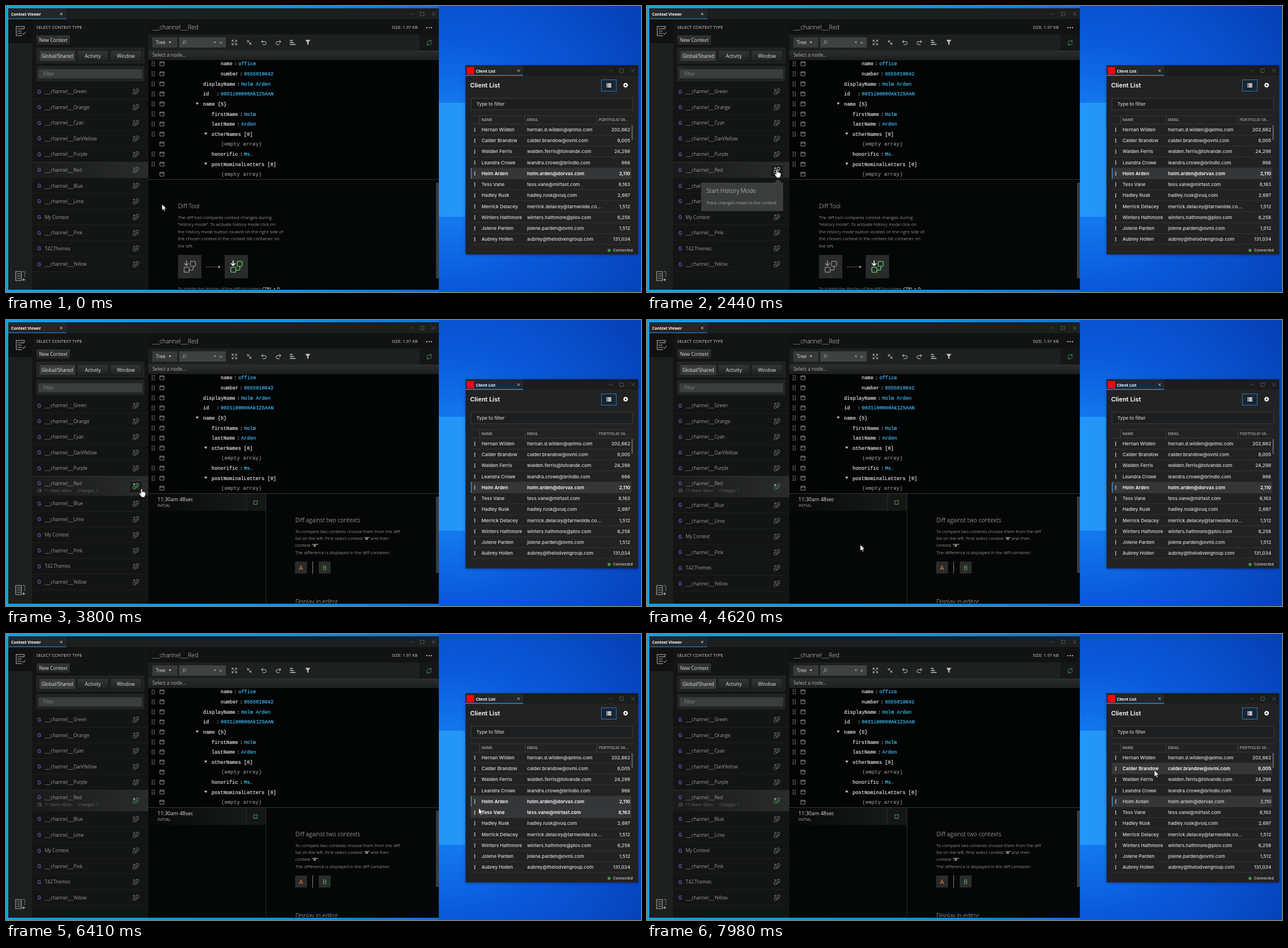
Write an HTML page that moves like this. It is 1115 px wide and 502 px high and loops after 8000 ms.

```html
<!DOCTYPE html>
<html lang="en">
<head>
<meta charset="utf-8">
<title>Context Viewer</title>
<style>
html, body { margin: 0; width: 100%; height: 100%; overflow: hidden; background: #0a58d0; }
svg { display: block; }
text { font-family: "Open Sans", "Noto Sans", sans-serif; white-space: pre; }
.light { font-weight: 300; }
.bold { font-weight: 700; }
.mono { font-family: "Liberation Mono", "DejaVu Sans Mono", monospace; }
.client { font-family: Inter, Roboto, sans-serif; font-weight: 500; }
.head { font-family: Inter, Roboto, sans-serif; font-weight: 600; }
.strong .client { font-weight: 600; fill: #fff; }
.em { font-weight: 600; font-style: italic; fill: #e6e2c8; }
.line { fill: none; stroke: currentColor; stroke-linecap: round; stroke-linejoin: round; }
</style>
</head>
<body>
<svg id="stage" width="1115" height="502" viewBox="0 0 1115 502" xmlns="http://www.w3.org/2000/svg"></svg>
<script>
const W = 1115, H = 502, LOOP = 8000;

// Markup helpers
const box = (x, y, w, h, fill, more = '') =>
  `<rect x="${x}" y="${y}" width="${w}" height="${h}" fill="${fill}" ${more}/>`;
const txt = (x, y, s, size, fill, cls = '', more = '') =>
  `<text x="${x}" y="${y}" font-size="${size}" fill="${fill}" class="${cls}" ${more}>${s}</text>`;
const mono = (x, y, s, size, fill) =>
  txt(x, y, s, size, fill, 'mono', `stroke="${fill}" stroke-width=".22"`);
const line = (d, color, w = 1, more = '') =>
  `<path class="line" d="${d}" style="color:${color}" stroke-width="${w}" ${more}/>`;
const shape = (d, fill, more = '') => `<path d="${d}" fill="${fill}" ${more}/>`;
const group = (id, body, more = '') => `<g id="${id}" ${more}>${body}</g>`;
const at = (x, y, body, scale = 1) => `<g transform="translate(${x} ${y}) scale(${scale})">${body}</g>`;
const stops = list => list.map(([o, c]) => `<stop offset="${o}" stop-color="${c}"/>`).join('');
const grad = (id, list, dir = 'x2="1" y2="0"') =>
  `<linearGradient id="${id}" ${dir}>${stops(list)}</linearGradient>`;
const down = 'x2="0" y2="1"';

const defs = `<defs>
  ${grad('sky', [[0, '#08a4ee'], [.45, '#0694ea'], [.68, '#0670e0']])}
  <radialGradient id="glow" gradientUnits="userSpaceOnUse" cx="775" cy="275" r="430">
    ${stops([[0, '#2c9cff'], [.2, '#147cf0'], [.5, '#0a5adc'], [1, '#0640b6']])}</radialGradient>
  ${grad('button', [[0, '#343636'], [1, '#202222']], down)}
  ${grad('node', [[0, '#2c2e2e'], [1, '#1c1e1e']], down)}
  ${grad('picked', [[0, '#191a1a'], [1, '#2a2c2c']])}
  ${grad('entry', [[0, '#070808'], [1, '#1b1c1c']])}
  <clipPath id="pane"><rect x="250" y="305" width="510" height="192"/></clipPath>
  <filter id="shadow"><feDropShadow dx="0" dy="1" stdDeviation="2.5" flood-color="#001040" flood-opacity=".45"/></filter>
</defs>`;

function backdrop() {
  return box(0, 0, W, H, 'url(#sky)') + box(760, 0, 355, H, 'url(#glow)') +
    box(606, 170, 200, 200, '#2496f8');
}

function controls(x, y) {
  return line(`M${x - 3} ${y}h6`, '#555', .8) +
    line(`M${x + 16} ${y - 3}h6v6h-6z`, '#666', .8) +
    line(`M${x + 36} ${y - 3}l6 6m0 -6l-6 6`, '#666', .8);
}
const cross = (x, y) => line(`M${x - 1.7} ${y - 1.7}l3.4 3.4m0 -3.4l-3.4 3.4`, '#ddd', .9);

const linkIcon = sign => `<g class="line">
  <rect x="-4.8" y=".4" width="4.4" height="4.4" rx="1.2"/>
  <rect x=".6" y="-4.6" width="4.4" height="4.4" rx="1.2"/>
  <path d="M-.4 3H1.8Q3 3 3 1.8V-.2"/>${sign}</g>`;
const plus = '<path class="plus" d="M-3 -4.6v3m-1.5 -1.5h3"/>';
const arrow = '<path d="M-2.8 -5v4m-1.6 -1.6l1.6 1.6l1.6 -1.6"/>';
const link = (id, x, y, color) =>
  `<g id="${id}" transform="translate(${x} ${y})" style="color:${color}" stroke-width=".8">${linkIcon(plus)}</g>`;

const ROW = 27.55;
const rowY = i => 150.2 + i * ROW;
const NAMES = ['Green', 'Orange', 'Cyan', 'DarkYellow', 'Purple', 'Red', 'Blue', 'Lime', '', 'Pink', '', 'Yellow']
  .map(n => n && '___channel___' + n);
NAMES[8] = 'My Context';
NAMES[10] = 'T42.Themes';
const RED = 5, BLUE = 6;

const rowLabel = (i, y = rowY(i)) =>
  txt(55, y + 3.4, 'G', 8.8, '#7c6ad0', 'client') + txt(68, y + 3, NAMES[i], 8.4, '#dcdcdc', 'light');

function listRow(i) {
  const y = rowY(i), top = y - ROW / 2;
  return (i === BLUE ? box(46, top, 204, ROW, 'url(#picked)', 'id="blueHover"') : '') +
    box(46, top + ROW - 1, 204, 1, '#1e2020') + rowLabel(i) + link('link' + i, 228, y, '#8a8c8c');
}

function redRow() {
  const y = rowY(RED), top = y - ROW / 2;
  return box(46, top, 204, ROW, 'url(#picked)', 'id="redBack"') +
    box(46, top, 204, 1, '#2c2e2e') +
    group('redLabel', rowLabel(RED)) +
    group('redInfo',
      line('M56.5 297h5v5h-5zM59 298v1.7h1.4', '#777', .7) +
      txt(67, 302.4, '11:30am 48sec', 7.2, '#858585', 'light') +
      txt(127, 302.4, 'Changes: 1', 7.2, '#858585', 'light')) +
    group('redButton', box(218, 278, 21, 20, '#1c1e1e') + box(218, 278, 21, 1, '#434545') + box(218, 297, 21, 1, '#050505')) +
    link('redLink', 228, y, '#8a8c8c');
}

function sidebar() {
  const tab = (x, w, s, on) => box(x, 78, w, 19, on ? '#3a3c3c' : 'url(#button)', 'stroke="#111" stroke-width=".8"') +
    txt(x + w / 2, 90.5, s, 8.4, '#e2e2e2', '', 'text-anchor="middle"');
  const doc = 'M-7 -8h14M-7 -8v16h10M-4 -4h8M-4 0h6M-4 4h6M7 -8v4h-3M4 4l2 2l3 -4';
  return box(4, 23, 42, 475, '#1d1f1f') + box(4, 23, 42, 42, '#101111') +
    at(25, 44, line(doc, '#b8b8b8', 1)) +
    at(25, 474, line('M-8 -8h10v16h-10zM-5 -4h5M-5 0h5M-5 4h5', '#aaa', 1.1) +
      line('M5 -8h3v11', '#aaa', 1, 'stroke-dasharray="1.5 2"') + line('M6 4.5v4m-2 -2h4', '#ccc')) +
    box(46, 23, 204, 475, '#131414') +
    txt(53, 40, 'SELECT CONTEXT TYPE', 7.65, '#cfcfcf') +
    box(53, 51, 60, 18, 'url(#button)', 'stroke="#0a0a0a" stroke-width=".8"') +
    txt(58, 63, 'New Context', 8.4, '#ddd') +
    box(53, 73, 190, 28, '#222424') +
    tab(58, 64, 'Global/Shared', 1) + tab(125, 55, 'Activity') + tab(183, 55, 'Window') +
    box(53, 105, 190, 27, '#222424') + box(57, 111, 182, 16, '#3b3d3d') +
    txt(65, 122, 'Filter', 8.4, '#858787') +
    NAMES.map((n, i) => i < RED ? listRow(i) : '').join('') +
    group('below', NAMES.map((n, i) => i > RED ? listRow(i) : '').join('')) +
    group('red', redRow());
}

function toolbar() {
  const c = '#c4c4c4';
  return box(250, 23, 510, 27, '#111212') +
    txt(257, 41, '___channel___Red', 10.4, '#ddd', 'light') +
    txt(723, 39.5, 'SIZE: 1.97 KB', 7.6, '#ccc', '', 'text-anchor="end"') +
    [739, 743, 747].map(x => `<circle cx="${x}" cy="38" r="1.1" fill="#ddd"/>`).join('') +
    box(250, 50, 510, 28, '#1e2020') + box(726, 50, 34, 28, '#151616') +
    box(257, 55, 44, 18, '#383a3a') + txt(263, 67, 'Tree', 8.4, '#ddd') +
    shape('M285.500 62.500h4.600l-2.300 3z', c) +
    box(304, 55, 82, 18, '#404242') +
    line('M310 67l2 -2', '#999') + '<circle cx="313.600" cy="63" r="2.300" fill="none" stroke="#999"/>' +
    shape('M364.500 62.500h4.600l-2.300 3zM374.700 65.500h4.600l-2.300 -3z', '#999') +
    at(401, 64, line('M-4 -1.500v-2.500h2.500M1.500 -4h2.500v2.500M4 1.500v2.500h-2.500M-1.500 4h-2.500v-2.500M-4 -4l3 3M4 -4l-3 3M4 4l-3 -3M-4 4l3 -3', c, .9)) +
    at(427, 64, line('M-4 -4l3 3m0 -2.500v2.500h-2.500M4 4l-3 -3m0 2.500v-2.500h2.500', c)) +
    at(453, 64, line('M-2 -4l-2.500 2.500l2.500 2.500M-4.500 -1.500h5.500q3 0 3 2.700t-3 2.700h-3', c)) +
    at(478, 64, line('M2 -4l2.500 2.500l-2.500 2.500M4.500 -1.500h-5.500q-3 0 -3 2.700t3 2.700h3', c)) +
    at(503, 64, line('M-4 -3.500h4M-4 0h6M-4 3.500h9', c, 1.3)) +
    at(530, 64, shape('M-4.500 -4.500h9l-3.400 4.200v4.800l-2.200 -1.400v-3.400z', c)) +
    at(743, 64.500, line('M-4 .500a4 4 0 0 1 7 -3M4 -.500a4 4 0 0 1 -7 3M3.300 -4.800v2.500h-2.500M-3.300 4.800v-2.500h2.500', '#3f9a4e', .9)) +
    box(250, 78, 510, 17, 'url(#node)') + txt(257, 89, 'Select a node...', 8.4, '#b4b4b4');
}

// Tree lines: x of the key, key, x of the value, value
const TREE = [
  [377, 'name', 408, 'office'], [377, 'number', 418, '0555010042'],
  [346, 'displayName', 413, 'Holm Arden'], [346, 'id', 377, '0031i00000AkIZ5AAN'],
  [346, 'name {5}'], [361, 'firstName', 418, 'Holm'], [361, 'lastName', 413, 'Arden'],
  [361, 'otherNames [0]'], [378, ''], [361, 'honorific', 418, 'Ms.'],
  [361, 'postNominalLetters [0]'], [378, '']
];

function tree() {
  return box(250, 95, 510, 209, '#030404') + TREE.map(([x, key, vx, value], i) => {
    const y = 101.4 + i * 17.62, base = y + 3;
    let out = line(`M270.500 ${y - 3.500}h7v7h-7zM270.500 ${y - 1.800}h7`, '#a8a8a8', .8);
    if (!key) return out + mono(x, base, '(empty array)', 9.1, '#888');
    for (let k = 0; k < 6; k++) out += box(255.8 + k % 2 * 3.6, y - 4.2 + (k >> 1) * 3.4, 1.7, 1.7, '#8c8c8c');
    out += mono(x, base, key, 8.6, '#e0e0e0');
    if (value) out += txt(vx - 7.4, base, ':', 8.6, '#e8d0a8', 'mono bold') + mono(vx, base, value, 8.6, '#3dbcf6');
    else out += shape(`M${x - 13} ${y - 2.500}h5.600l-2.800 4.200z`, '#bbb');
    return out;
  }).join('');
}

function lines(x, y, list) {
  return list.map((s, i) => txt(x, y + i * 12.4, s, 7.92, '#d4d4d4', 'light')).join('');
}
const em = s => `<tspan class="em">${s}</tspan>`;

function introPane() {
  const tile = (x, color, tip) => box(x, 437, 41, 41, '#2a2b2b') + at(x + 20.5, 457.5,
    `<g style="color:${color}" stroke-width=".65">${linkIcon('')}</g>
     <g class="line" style="color:${tip}" stroke-width=".8">${arrow}</g>`, 2.05);
  return txt(302, 355, 'Diff Tool', 10.4, '#d4d4d4', 'light') +
    lines(302, 374, ['The diff tool compares context changes during',
      '“History mode”. To activate history mode click on',
      'the History mode button located on the right side of',
      'the chosen context in the context list container on', 'the left.']) +
    tile(302, '#8c8c8c', '#8c8c8c') + tile(384, '#5cc46c', '#fff') +
    line('M352 458h20', '#bbb', 1, 'stroke-dasharray=".5 2.500"') + shape('M373 455.500l3.500 2.500l-3.500 2.500z', '#bbb') +
    lines(302, 499, ['To toggle the display of the diff tool press ' + em('CTRL + D')]);
}

function diffPane() {
  const tile = (x, s, c) => box(x, 424, 21, 21, '#2a2b2b') +
    txt(x + 10.5, 439, s, 11, c, '', 'text-anchor="middle"');
  return box(250, 305, 206, 30, 'url(#entry)') + box(423, 305, 33, 30, '#151616') + box(422, 305, 1, 30, '#2a2c2c') +
    txt(266, 317.6, '11:30am 48sec', 9, '#ddd') + txt(266, 328, 'INITIAL', 6.9, '#aaa') +
    line('M438 317.500h-3v6h6v-3M439 317h2.500v2.500', '#4cae5a', 1) +
    box(456, 305, 1, 193, '#2a2c2c') +
    txt(508, 355, 'Diff against two contexts', 10.4, '#d4d4d4', 'light') +
    lines(508, 373.6, ['To compare two contexts choose them from the diff',
      `list on the left. First select context ${em('“A”')} and then`,
      `context ${em('“B”')}.`, 'The difference is displayed in the diff container.']) +
    tile(507.5, 'A', '#e8864c') + tile(549, 'B', '#58b868') +
    line('M538.500 425v20', '#ddd', 1, 'stroke-dasharray="1.500 2.400"') +
    txt(508, 498, 'Display in editor', 10.4, '#d4d4d4', 'light');
}

function viewer() {
  return box(4, 4, 756, 494, '#050606') + box(4, 4, 756, 19, '#1c1e1f') + box(4, 4, 102, 19, '#242729') +
    box(4, 22, 102, 1.5, '#1e8fe8') + txt(9, 17, 'Context Viewer', 6.9, '#fff', 'bold') + cross(97, 14) +
    controls(712, 14) + sidebar() + toolbar() + tree() +
    box(250, 304, 510, 1, '#333535') +
    `<g clip-path="url(#pane)">${group('intro', introPane())}${group('diff', diffPane())}</g>` +
    box(755, 310, 5, 168, '#3a3c3c', 'id="scroll"');
}

const CLIENTS = [
  ['Hernan Wilden', 'hernan.d.wilden@qelmo.com', '202,662'],
  ['Calder Brandow', 'calder.brandow@ovmi.com', '8,005'],
  ['Walden Ferris', 'walden.ferris@tolvande.com', '24,298'],
  ['Leandra Crowe', 'leandra.crowe@brindlo.com', '966'],
  ['Holm Arden', 'holm.arden@dorvax.com', '2,110'],
  ['Tess Vane', 'tess.vane@mirtast.com', '8,163'],
  ['Hadley Rusk', 'hadley.rusk@vuq.com', '2,697'],
  ['Merrick Delacey', 'merrick.delacey@tarnwolde.co...', '1,512'],
  ['Winters Hathmore', 'winters.hathmore@plov.com', '6,258'],
  ['Jolene Parden', 'jolene.parden@ovmi.com', '1,512'],
  ['Aubrey Hollen', 'aubrey@thelodvengroup.com', '131,034']
];
const CROW = 19.22, CTOP = 207.6, CHOSEN = 4;

function clientRow([name, mail, sum], i) {
  const top = CTOP + i * CROW, y = top + CROW / 2;
  const cell = (x, s, more) => txt(x, y + 2.8, s, 8.2, '#dadada', 'client', more);
  return group('client' + i, box(816, top, 282, CROW, '#343638', 'class="back"') +
    (i === CHOSEN ? box(816, top, 1.6, CROW, '#2090f0') : '') +
    box(816, top + CROW - .8, 282, .8, '#343637') +
    [-2.6, 0, 2.6].map(d => box(822.3, y + d - .8, 1.6, 1.6, '#eee')).join('') +
    cell(835, name) + cell(915, mail) + cell(1096, sum, 'text-anchor="end"'));
}

function clientList() {
  const head = (x, s) => txt(x, 202.4, s, 6.4, '#b0b0b0', 'client');
  const gear = '<circle cx="1088" cy="139" r="2.500" fill="none" stroke="#fff" stroke-width="1.900"/>' +
    '<circle cx="1088" cy="139" r="3.700" fill="none" stroke="#fff" stroke-width="1.200" stroke-dasharray="1.453"/>';
  return box(807, 104, 303, 332, '#202223', 'filter="url(#shadow)"') +
    box(807, 104, 303, 18, '#1a1c1d') + box(807, 104, 101, 18, '#242729') +
    box(807, 121, 101, 1.5, '#1e8fe8') + box(809, 107, 13, 13, '#f00808') +
    txt(825, 116.5, 'Client List', 6.9, '#fff', 'bold') + cross(900, 113.5) + controls(1062, 113.5) +
    txt(815, 142.5, 'Client List', 10.9, '#fff', 'head') +
    box(1045.5, 129.5, 26, 20, '#1a2530', 'stroke="#2878c0"') +
    [136, 138.6, 141.2].map(y => box(1054.5, y - .2, 1.7, 1.8, '#fff') + box(1056.8, y - .2, 6, 1.8, '#fff')).join('') + gear +
    box(816.5, 162, 284, 20, '#1c1e1f', 'stroke="#3c3e40" stroke-width=".9"') +
    txt(826, 175, 'Type to filter', 8.2, '#c8c8c8', 'client') +
    box(816, 192, 285, .8, '#343637') + head(835, 'NAME') + head(915, 'EMAIL') + head(1041, 'PORTFOLIO VA...') +
    [831, 911, 1037].map(x => box(x, 193, 1, 14, '#3c3e40')).join('') + box(816, 206.8, 282, .8, '#3c3e40') +
    CLIENTS.map(clientRow).join('') + box(1098.2, 209, 2.6, 26, '#55585a') +
    '<circle cx="1059" cy="429" r="2.700" fill="#3f9a4c"/>' + txt(1066, 431.2, 'Connected', 6.6, '#d0d0d0', 'client');
}

const overlay = group('tooltip', shape('M95 310H224L230 303.500L236 310H239V360H95Z', '#3b3d3d') +
    txt(104, 328.4, 'Start History Mode', 10.4, '#ddd', 'light') +
    txt(104, 348, 'Track changes made to the context', 7.9, '#ddd', 'light')) +
  group('pointer', shape('M0 0V10.500L2.400 8.300L4 12L5.600 11.300L4 7.700H7.400Z', '#fff', 'stroke="#222" stroke-width=".5"')) +
  group('hand', shape('M-1.200 .600Q0 -1 1.200 .600V5Q2.400 4.200 3.200 5.200Q4.400 4.600 5.200 5.800Q6.800 5.400 7 7V10' +
    'Q6.600 12 5.600 13V14.500H-.600V13.200Q-2.600 11 -4 8.400Q-4.200 6.800 -2.600 7.200L-1.200 8.600Z', '#fff', 'stroke="#111" stroke-width=".7"'));

const stage = document.getElementById('stage');
stage.innerHTML = defs + backdrop() + viewer() + clientList() + overlay;

// Motion
const PATH = [
  [0, 274, 348], [780, 274, 348], [920, 270, 343], [1270, 243, 302.5], [1620, 229, 290], [1970, 228, 288],
  [2370, 228, 288], [2440, 228, 287], [3310, 228, 287], [3800, 238, 296.5], [4080, 268, 326], [4360, 356, 397],
  [4550, 356, 397], [5380, 577, 367], [5800, 665, 362], [6200, 777, 341], [6690, 901, 259], [6900, 902, 256],
  [7030, 902, 256], [7380, 891, 239.5], [LOOP, 891, 239.5]
];
const GROW = [[0, 0], [3380, 0], [3800, 6.8], [4080, 9.5], [LOOP, 9.5]];
const TIP = [[0, 0], [1620, 0], [1970, 1], [3240, 1], [3520, 0], [LOOP, 0]];
const SWAP = [[0, 0], [3380, 0], [3590, 1], [LOOP, 1]];
const BEATS = [850, 2440, 3170, 4620, 5450, 6270, 7100, 7780];

function tween(keys, t, k = 1) {
  const i = Math.max(1, keys.findIndex(key => key[0] >= t));
  const a = keys[i - 1], b = keys[i];
  return a[k] + (b[k] - a[k]) * (t - a[0]) / (b[0] - a[0]);
}
// The screen refreshes every 70 ms, counted from each new gesture.
function tick(t) {
  const from = BEATS.filter(b => b <= t).pop() || 0;
  return from + Math.floor((t - from) / 70) * 70;
}

const $ = id => document.getElementById(id);
const el = {};
for (const id of ['blueHover', 'redBack', 'redLabel', 'redInfo', 'redButton', 'redLink', 'below', 'intro', 'diff',
  'scroll', 'tooltip', 'pointer', 'hand']) el[id] = $(id);
const redPlus = el.redLink.querySelector('.plus');
const clients = CLIENTS.map((c, i) => $('client' + i));
const backs = clients.map(g => g.querySelector('.back'));
const fade = (node, v) => node.setAttribute('opacity', v);
const move = (node, x, y) => node.setAttribute('transform', `translate(${x} ${y})`);

function draw(time) {
  const t = tick(time);
  const x = tween(PATH, t, 1), y = tween(PATH, t, 2);
  const grow = tween(GROW, t), swap = tween(SWAP, t);
  const inList = x > 46 && x < 250, edge = rowY(RED) + ROW / 2 + grow;
  const onRed = inList && y < edge - .2, tracking = t >= 3170;

  move(el.pointer, x, y);
  move(el.hand, x, y);
  fade(el.pointer, inList ? 0 : 1);
  fade(el.hand, inList ? 1 : 0);

  move(el.below, 0, grow);
  fade(el.blueHover, inList && !onRed && y < edge + ROW ? 1 : 0);
  el.redBack.setAttribute('height', ROW + grow);
  move(el.redLabel, 0, -grow * .13);
  fade(el.redInfo, Math.min(1, grow / 6));
  fade(el.redButton, onRed ? 1 : 0);
  move(el.redButton, 0, grow / 2);
  move(el.redLink, 228, rowY(RED) + grow / 2);
  el.redLink.style.color = tracking ? (onRed ? '#62d676' : '#4fa65e') : onRed ? '#e0e0e0' : '#8a8c8c';
  redPlus.style.color = tracking ? '#eee' : 'inherit';
  redPlus.style.stroke = 'currentColor';

  fade(el.tooltip, tween(TIP, t));
  fade(el.intro, 1 - swap);
  fade(el.diff, swap);
  el.scroll.setAttribute('height', 168 - 34 * swap);

  const over = x > 816 && x < 1098 ? Math.floor((y - CTOP) / CROW) : -1;
  clients.forEach((g, i) => {
    const chosen = i === CHOSEN;
    fade(backs[i], chosen || i === over ? 1 : 0);
    g.setAttribute('class', i === over || chosen && t < 7780 ? 'strong' : '');
  });
}

const start = performance.now();
function frame() {
  draw((performance.now() - start) % LOOP);
  requestAnimationFrame(frame);
}
frame();
</script>
</body>
</html>
```
